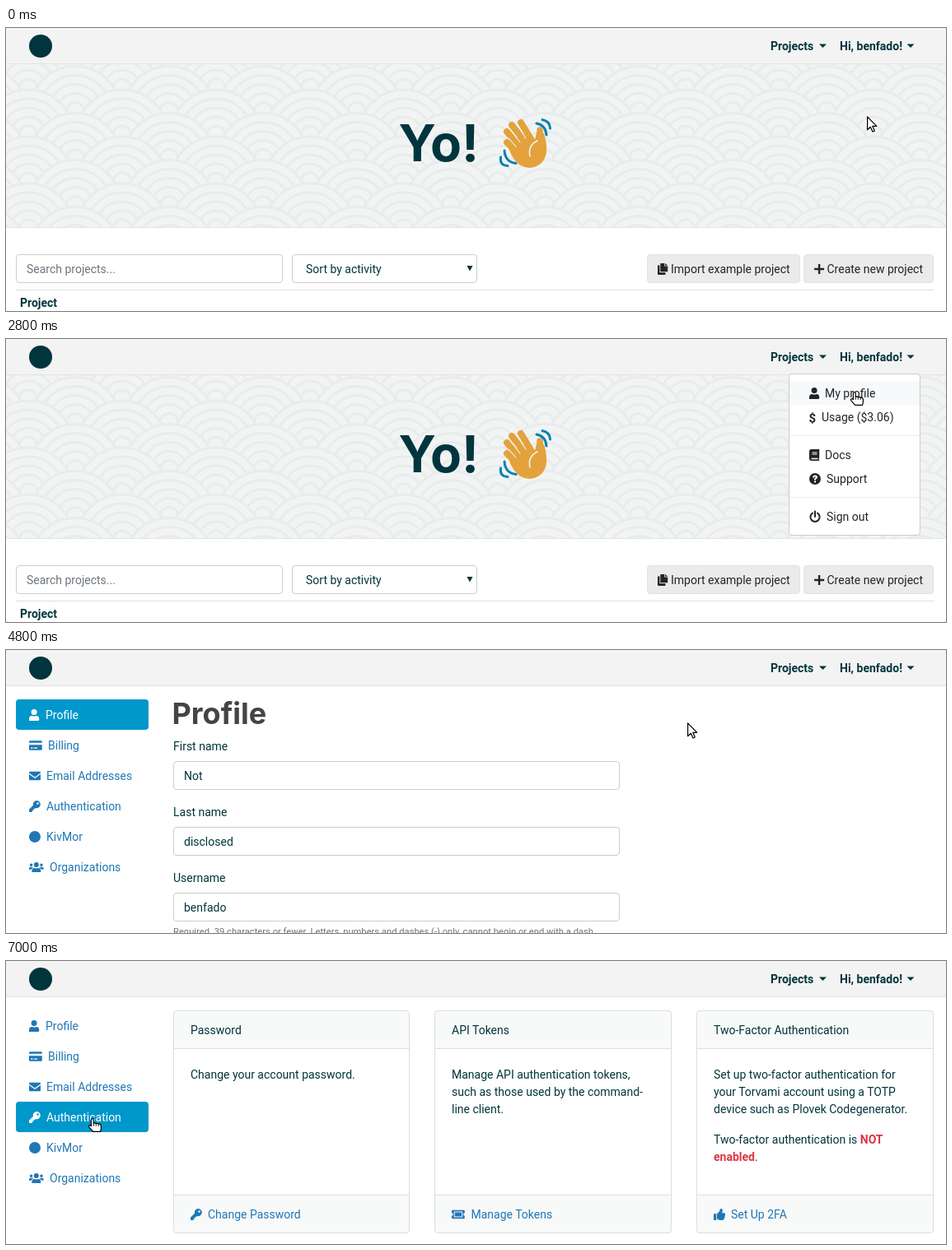
Recreate the animation shown at these times as an HTML page. Size 1141 px wide and 344 px high, loop 8000 ms.

```html
<!DOCTYPE html>
<html lang="en">
<head>
<meta charset="utf-8">
<title>Account settings walkthrough</title>
<style>
html, body { margin: 0; width: 100%; height: 100%; overflow: hidden; background: #fff; }
svg { display: block; width: 1141px; height: 344px; font: 14px Roboto, sans-serif; }
text { white-space: pre; }
.bold { font-weight: 700; }
.head { font-family: Inter, sans-serif; font-weight: 700; }
</style>
</head>
<body>
<svg id="stage" viewBox="0 0 1141 344" xmlns="http://www.w3.org/2000/svg"></svg>
<script>
const INK = '#01353d', LINK = '#2077b4', LOOP = 8000, USER = 'benfado';

const ICONS = {
  user: 'M6.1 0a3.5 3.5 0 1 1 0 7 3.5 3.5 0 1 1 0-7zM0 14v-2.3q0-3.6 3.5-3.6 2.6 1 5.2 0 3.5 0 3.5 3.6v1q0 1.3-1.3 1.3z',
  book: 'M2.4 0h9.8v10.6l-.5.6v1.6l.5.3v.9H2.4Q0 14 0 11.6V2.4Q0 0 2.4 0zM3.5 3.4v1h6v-1zM3.5 5.4v1h6v-1zM2.5 10.8v1.5h8v-1.5z',
  help: 'M7 0a7 7 0 1 1 0 14 7 7 0 1 1 0-14zM4.1 5.2Q4.4 2.5 7.2 2.5 10 2.7 10 5 10 6.5 8 7.6v1H6V6.8Q7.9 5.8 7.8 5 7.5 4.2 6.9 4.2 6 4.2 5.5 6zM6 9.5v2h2v-2z',
  card: 'M0 3.7V2.5q0-1.3 1.3-1.3h13.2q1.3 0 1.3 1.3v1.2zM0 6.2h15.8v5.2q0 1.3-1.3 1.3H1.3Q0 12.7 0 11.4zM2 9.6v1.2h2.6V9.6zM5.7 9.6v1.2h4.2V9.6z',
  mail: 'M0 3q0-1.3 1.3-1.3h11.4Q14 1.7 14 3v.6L7 8.6 0 3.6zM0 5l7 5 7-5v6q0 1.2-1.3 1.2H1.3Q0 12.2 0 11z',
  key: 'M9.4 0a4.6 4.6 0 1 1-1.5 9L7 10H5.6v1.7H3.9v1.7L3.3 14H.6L0 13.4v-2.7l5-5A4.6 4.6 0 0 1 9.4 0zM10.5 2.2a1.3 1.3 0 1 0 0 2.6 1.3 1.3 0 1 0 0-2.6z',
  dot: 'M7 0a7 7 0 1 1 0 14 7 7 0 1 1 0-14z',
  users: 'M8.8 1a3 3 0 1 1 0 6 3 3 0 1 1 0-6zM3.4 13v-1.6q0-3 3-3.4 2.4.8 4.8 0 3 .4 3 3.4V13zM2.6 2.4a1.8 1.8 0 1 1 0 3.6 1.8 1.8 0 1 1 0-3.6zM15 2.4a1.8 1.8 0 1 1 0 3.6 1.8 1.8 0 1 1 0-3.6zM0 9.8V8.6Q0 7 1.7 6.8h2q.9 0 1.3.6-2 .9-2.2 2.4zM17.6 9.8V8.6q0-1.6-1.7-1.8h-2q-.9 0-1.3.6 2 .9 2.2 2.4z',
  ticket: 'M1.3 1.8h13.2q1.3 0 1.3 1.3v2.2a1.7 1.7 0 0 0 0 3.4v2.2q0 1.3-1.3 1.3H1.3Q0 12.2 0 10.9V8.7a1.7 1.7 0 0 0 0-3.4V3.1q0-1.3 1.3-1.3zM2.7 3.6v6.8h10.4V3.6zM3.7 4.6h8.4v4.8H3.7z',
  thumb: 'M0 6.2h3.2V14H0zM4 6.6l3.2-3.5Q7.5 0 9 0q2.5.2 1.6 3.6L10 5.2h3q1.7.8.8 2.4.5 1.4-.5 2.4.2 1.3-.7 2.2-.2 1.7-1.6 1.8H8q-2 0-4-1.4z',
  copy: 'M0 2.6h2.4v8.6h7V14H.8L0 13.2zM3.3 0h5v3.6h3.9v6.7H3.3zM9.2 0l3 2.8h-3z',
  plus: 'M4.9 1h2.4v4.8h4.8v2.4H7.3V13H4.9V8.2H.1V5.8h4.8z'
};

const text = (x, y, s, attrs = '') => `<text x="${x}" y="${y}" ${attrs}>${s}</text>`;
const icon = (name, x, y) => `<path fill-rule="evenodd" transform="translate(${x} ${y})" d="${ICONS[name]}"/>`;
const rect = (x, y, w, h, fill, attrs = '') => `<rect x="${x}" y="${y}" width="${w}" height="${h}" fill="${fill}" ${attrs}/>`;
const box = (x, y, w, h, fill = '#fff', line = '#ccc') =>
  rect(x + .5, y + .5, w - 1, h - 1, fill, `rx="3.5" stroke="${line}"`);
const group = (id, body, attrs = '') => `<g id="${id}" ${attrs}>${body}</g>`;
const strokes = (d, color, w) =>
  `<path d="${d}" fill="none" stroke="${color}" stroke-width="${w}" stroke-linecap="round"/>`;

function waves() {
  let s = '';
  for (let row = 0; row < 10; row++) {
    const y = 73 + row * 28.5, shift = row % 2 ? 57 : 0;
    for (let x = -30 + shift - 57; x < 1210; x += 114) {
      s += `<use href="#scale" x="${x}" y="${y}"/>`;
    }
  }
  return `<g clip-path="url(#hero)">${s}</g>`;
}

function scale() {
  return [55, 44, 33, 22, 11].map(r =>
    `<circle r="${r}" fill="#f2f4f3" stroke="#e9ecec" stroke-width="3"/>`).join('');
}

function wavingHand() {
  const skin = '#e3a23c', gap = '#f2f4f3', blue = '#0b80b3';
  return '<path d="M609 143Q617 169 635 170 652 169 656 152 657 141 653 128L644 127 642 136 634 126 614 137z" fill="' + skin + '"/>' +
    strokes('M608 139L624 154M608 126L626 147M614 118L633 142M625 115L639 138', skin, 8) +
    strokes('M648 124Q648 136 651 146', skin, 7.5) +
    strokes('M610 134L619 144M611 122L624 139M620 117L631 134', gap, 1.1) +
    strokes('M645 137Q633 143 636 156', gap, 1.6) +
    strokes('M651 111.500Q660 113 660.500 122M644 116Q655 118 656 130M600.500 157Q599 167 609 167.500M605 149Q606 163 619 164.500', blue, 3);
}

function home() {
  return rect(0, 44, 1141, 198, '#f2f4f3') + waves() + rect(0, 242, 1141, 1, '#e1e4e4') +
    text(476.5, 162, 'Yo!', 'class="head" font-size="62"') + wavingHand() +
    box(12, 275, 324, 35) + text(25, 298, 'Search projects...', 'fill="#6c757d"') +
    box(347, 275, 225, 35) + text(364, 298, 'Sort by activity') +
    '<path d="M559.500 289h7l-3.500 6.500z"/>' +
    box(778, 275, 186, 35, '#ebebeb', '#e2e2e2') + box(968, 275, 158, 35, '#ebebeb', '#e2e2e2') +
    `<g fill="#212529">${icon('copy', 791, 286)}${text(807, 298, 'Import example project')}` +
    `${icon('plus', 981, 286)}${text(996.5, 298, 'Create new project')}</g>` +
    rect(12, 318, 1114, 1, '#dcdfe0') + text(17, 339, 'Project', 'class="bold"');
}

function menu() {
  return box(950, 42, 160, 197, '#fff', '#ccc') +
    rect(951, 51, 158, 29, '#fff', 'id="row"') +
    group('first', icon('user', 975, 59) + text(994, 71, 'My profile')) +
    text(974.5, 100.5, '$', 'class="bold" font-size="15"') + text(990, 100, 'Usage ($3.06)') +
    rect(951, 117, 158, 1, '#e9ecef') +
    icon('book', 975, 134) + text(994, 146, 'Docs') +
    icon('help', 975, 163) + text(996, 175, 'Support') +
    rect(951, 192, 158, 1, '#e9ecef') +
    strokes('M979 211.600a5.600 5.600 0 1 0 6 0M982 209.500v6.500', '#212529', 2) + text(996, 221, 'Sign out');
}

const TABS = [
  ['user', 48, 'Profile'], ['card', 51, 'Billing'], ['mail', 49, 'Email Addresses'],
  ['key', 49, 'Authentication'], ['dot', 49, 'KivMor'], ['users', 53, 'Organizations']
];

function sidebar() {
  return rect(12, 60, 161, 37, '#0097cb', 'id="pill" rx="4"') +
    TABS.map(([name, x, label], i) =>
      group('tab' + i, icon(name, 28, 72 + 37 * i) + text(x, 84 + 37 * i, label))).join('');
}

function profile() {
  const fields = [['First name', 'Not'], ['Last name', 'disclosed'], ['Username', USER]];
  return text(201.5, 89.5, 'Profile', 'class="head" font-size="36" fill="#444"') +
    fields.map(([label, value], i) => text(203, 122 + 80 * i, label) +
      box(203, 135 + 80 * i, 542, 35) + text(216, 158 + 80 * i, value)).join('') +
    text(203, 346, 'Required. 39 characters or fewer. Letters, numbers and dashes (-) only, cannot begin or end with a dash.',
      'font-size="11.2" fill="#6c757d"') +
    group('fill', rect(721.500, 146.500, 10, 13, '#fff', 'rx="1" stroke="#858585" stroke-width="1.600"') +
      '<circle cx="726.500" cy="151" r="1.600"/><path d="M723.500 156v-1.500q3-2.500 6 0v1.500zM723.500 157h6v1h-6z"/>', 'fill="#777"');
}

function card(x, w, title, lines, name, labelX, action) {
  const edge = '#dcdfdf';
  return box(x, 60, w, 271, '#f8f9f9', edge) + rect(x + 1, 106, w - 2, 179, '#fff') +
    rect(x, 106, w, 1, edge) + rect(x, 284, w, 1, edge) +
    text(x + 21, 89, title) +
    lines.map(([y, s]) => text(x + 21, y, s)).join('') +
    `<g fill="${LINK}">${icon(name, x + 21, 301)}${text(labelX, 313, action)}</g>`;
}

function security() {
  const red = s => `<tspan class="bold" fill="#dc3545">${s}</tspan>`;
  return card(203, 287, 'Password', [[143, 'Change your account password.']], 'key', 245, 'Change Password') +
    card(520, 288, 'API Tokens', [
      [143, 'Manage API authentication tokens,'],
      [164, 'such as those used by the command-'],
      [185, 'line client.']], 'ticket', 564.5, 'Manage Tokens') +
    card(838, 288, 'Two-Factor Authentication', [
      [143, 'Set up two-factor authentication for'],
      [164, 'your Torvami account using a TOTP'],
      [185, 'device such as Plovek Codegenerator.'],
      [222, 'Two-factor authentication is ' + red('NOT')],
      [243, red('enabled') + '.']], 'thumb', 880, 'Set Up 2FA');
}

function header() {
  return rect(0, 0, 1141, 43, '#f3f3f3') + rect(0, 43, 1141, 1, '#e0e2e2') +
    `<circle cx="42" cy="22" r="14" fill="${INK}"/>` +
    text(928, 27, 'Projects', 'class="bold"') + '<path d="M987 19.500h9l-4.500 4.500z"/>' +
    group('hello', text(1012, 27, `Hi, ${USER}!`, 'class="bold"') + '<path d="M1093.500 19.500h9l-4.500 4.500z"/>');
}

function cursor() {
  const pen = 'fill="#fff" stroke="#000" stroke-width="1.200" stroke-linejoin="round"';
  return group('arrow', `<path ${pen} d="M.6.800V16.700L4.300 13.300 6.900 19 9.300 18 6.800 12.300H11.800z"/>`) +
    group('hand', `<path ${pen} d="M-1.600 9V2Q-1.600.600-.2.600 1.200.600 1.200 2V5.800L7.800 6.900Q10.400 7.400 10.400 9.800V12.500L9.600 16.400H.7L-3.900 11.200Q-5.200 9.400-3.800 8.800-2.900 8.400-1.600 9.600z"/>` +
      strokes('M1.400 6.200v3M4.300 6.800v2.600M7.200 7.400v2.200', '#000', .9));
}

const stage = document.getElementById('stage');
stage.innerHTML =
  `<defs><clipPath id="hero">${rect(0, 44, 1141, 198, '#fff')}</clipPath><g id="scale">${scale()}</g></defs>` +
  `<g fill="${INK}">` + header() + group('home', home()) +
  group('menu', menu(), 'fill="#212529"') + group('side', sidebar()) +
  group('profile', profile()) + group('security', security()) + '</g>' +
  group('pointer', cursor());

const el = {};
stage.querySelectorAll('[id]').forEach(n => { el[n.id] = n; });
const show = (id, on) => el[id].setAttribute('display', on ? 'inline' : 'none');
const paint = (id, color) => el[id].setAttribute('fill', color);

// Pointer moves: departure, arrival, x, y
const MOVES = [
  [0, 700, 1106, 24], [700, 800, 1103, 20], [900, 1000, 1102, 19], [2000, 2100, 1086, 30],
  [2100, 2500, 1045, 79], [2700, 2800, 1030, 64], [4300, 4400, 1043, 70],
  [4500, 5400, 211, 138], [5400, 5500, 160, 173], [5600, 5700, 112, 192], [5800, 5900, 105, 191]
];

function pointerAt(t) {
  let x = 1045, y = 107;
  for (const [from, to, nx, ny] of MOVES) {
    if (t <= from) break;
    const p = Math.min(1, (t - from) / (to - from)), e = p * p * (3 - 2 * p);
    x += (nx - x) * e;
    y += (ny - y) * e;
  }
  return [Math.round(x), Math.round(y)];
}

function render(ms) {
  const t = Math.floor(ms / 100) * 100;
  const during = (a, b) => t >= a && t < b;
  const atHome = t < 4100, secure = t >= 7000, tab = secure ? 3 : 0;

  show('home', atHome);
  show('menu', during(1400, 4100));
  show('side', !atHome);
  show('profile', !atHome && !secure);
  show('security', secure);
  show('fill', during(5300, 5500));

  paint('hello', during(600, 2300) ? '#495054' : INK);
  paint('row', t >= 3400 ? INK : t >= 2300 ? '#f8f9fa' : '#fff');
  paint('first', t >= 3400 ? '#fff' : '#212529');
  el.pill.setAttribute('y', 60 + 37 * tab);
  TABS.forEach((_, i) => paint('tab' + i, i === tab ? '#fff' : LINK));

  const hand = during(600, 3500) || during(4100, 4400) || during(5700, 6600) || secure;
  show('hand', hand);
  show('arrow', !hand);
  el.pointer.setAttribute('transform', `translate(${pointerAt(t).join(' ')})`);
}

const start = performance.now();
function tick() {
  render((performance.now() - start) % LOOP);
  requestAnimationFrame(tick);
}
tick();
</script>
</body>
</html>
```
